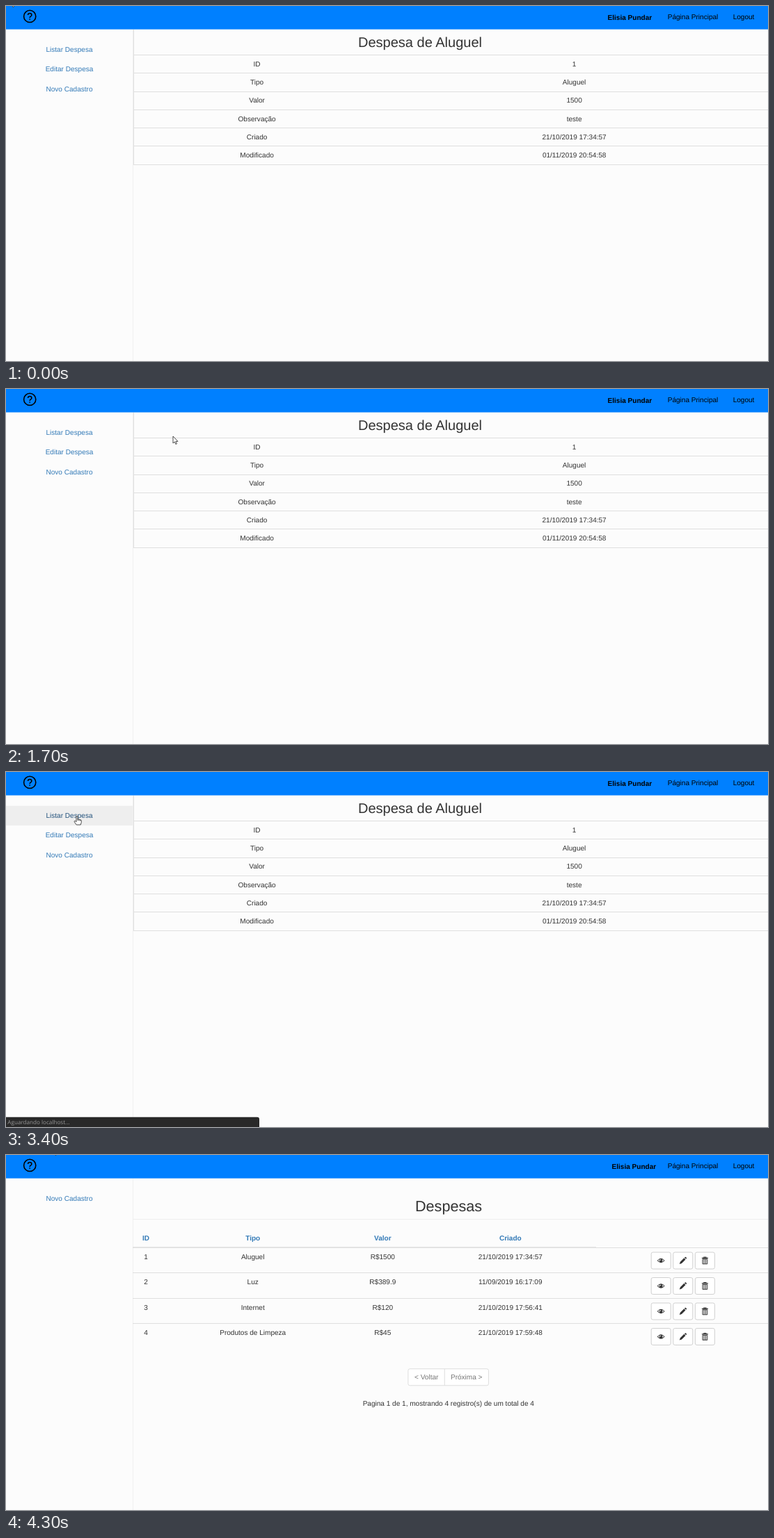
These frames come from a looping animation (1095 by 511 pixels, 4.8 s). An HTML page:

```html
<!DOCTYPE html>
<html lang="pt-BR">
<head>
<meta charset="utf-8">
<title>Despesas</title>
<style>
  html, body { margin: 0; width: 100%; height: 100%; overflow: hidden; background: #fcfcfc; }
  svg { display: block; width: 1095px; height: 511px; }
  text { font: 10.05px "Liberation Sans", Arial, sans-serif; fill: #333; text-anchor: middle; text-rendering: geometricPrecision; }
  .nav { fill: #000; }
  .bold { font-weight: bold; }
  .link { fill: #337ab7; }
  .hover { fill: #23527c; }
  .muted { fill: #777; }
  .status { font: 8.15px "Open Sans", "Noto Sans", sans-serif; text-anchor: start; }
  .cursor { fill: #fff; stroke: #222; stroke-width: .8; stroke-linejoin: round; }
</style>
</head>
<body>
<svg viewBox="0 0 1095 511">
  <defs>
    <g id="eye">
      <path d="M-5.4 0Q0-6.6 5.4 0Q0 6.6-5.4 0Z" fill="#333"/>
      <path d="M-4.1 0Q-3.2-1.5-1.9-2.1Q-2.8 0-1.6 1.7Q-3.2 1.2-4.1 0ZM4.1 0Q3.2-1.5 1.9-2.1Q2.8 0 1.6 1.7Q3.2 1.2 4.1 0Z" fill="#fff"/>
      <circle cx="-.7" cy="-.9" r=".8" fill="#fff"/>
    </g>
    <path id="pencil" fill="#333" d="M-5 5L-3.9 1.8L1.6-3.7L3.7-1.6L-1.8 3.9ZM2.2-4.3L3.2-5.2Q3.7-5.5 4.2-5L5-4.2Q5.5-3.7 5.2-3.2L4.3-2.2Z"/>
    <g id="trash" fill="none" stroke="#333">
      <path d="M-4.5-3.6H4.5M-1.6-4V-5H1.6V-4" stroke-width="1.1"/>
      <path d="M-3.4-2.2V4.8H3.4V-2.2ZM-1.2-2V4.5M1.2-2V4.5" stroke-width="1"/>
    </g>
  </defs>

  <path d="M182.5 34V511" stroke="#f0f0f0"/>
  <g id="detail"></g>
  <g id="list"></g>

  <rect width="1095" height="33.6" fill="#0080ff"/>
  <circle cx="34.2" cy="14.9" r="8.6" fill="none" stroke="#000" stroke-width="1.6"/>
  <path d="M31.5 13.1Q31.5 10.5 34.2 10.5T36.9 12.9Q36.9 14.1 35.5 14.9T34.2 17M34.2 18.2V19.8" fill="none" stroke="#000" stroke-width="1.5"/>
  <text id="user" class="nav bold" y="19.8">Elisia Pundar</text>
  <text class="nav" x="987" y="18.8">Página Principal</text>
  <text class="nav" x="1060" y="18.8">Logout</text>

  <g id="status">
    <path id="statusBox" fill="#292929"/>
    <text id="statusText" class="status" x="2.3" y="507.4"></text>
  </g>
  <path id="arrow" class="cursor" d="M0 0V10L2.3 8L3.9 11.5L5.5 10.8L3.9 7.4H7Z"/>
  <path id="hand" class="cursor" d="M-1 1Q0-.8 1 1V5Q2.3 4 2.8 5.4Q4.2 4.6 4.6 5.9Q6.3 5.4 6.3 7.2V9.5L5.2 13H-.8L-3.8 8.8Q-4.2 7-2.4 7.5L-1 8.8ZM1 5V7M2.8 5.4V7.2M4.6 5.9V7.5"/>
</svg>
<script>
const el = id => document.getElementById(id);
const text = (x, y, s, cls = '', extra = '') =>
  `<text x="${x}" y="${y}" class="${cls}" ${extra}>${s}</text>`;
const rule = (y, x = 183, end = 1095, color = '#dfdfdf') =>
  `<rect x="${x}" y="${y}" width="${end - x}" height="1" fill="${color}"/>`;

function detailPage() {
  const rows = [['ID', '1'], ['Tipo', 'Aluguel'], ['Valor', '1500'], ['Observação', 'teste'],
    ['Criado', '21/10/2019 17:34:57'], ['Modificado', '01/11/2019 20:54:58']];
  const links = ['Listar Despesa', 'Editar Despesa', 'Novo Cadastro'];
  return '<rect id="hoverRow" y="48.6" width="182" height="28.5" fill="#eee"/>' +
    links.map((s, i) => text(91, 65.6 + 28.5 * i, s, 'link', i ? '' : 'id="listLink"')).join('') +
    '<rect x="183" y="34" width="1" height="194" fill="#dfdfdf"/>' + rule(70) +
    text(595, 58.8, 'Despesa de Aluguel', '', 'style="font-size:20px"') +
    rows.map(([label, value], i) => {
      const y = 86.8 + 26.28 * i;
      return text(360.6, y, label) + text(816.6, y, value) + rule(Math.floor(96.7 + 26.3 * i));
    }).join('');
}

function listPage() {
  const columns = [201, 354.7, 541.3, 724.8];
  const rows = [['1', 'Aluguel', 'R$1500', '21/10/2019 17:34:57'],
    ['2', 'Luz', 'R$389.9', '11/09/2019 16:17:09'],
    ['3', 'Internet', 'R$120', '21/10/2019 17:56:41'],
    ['4', 'Produtos de Limpeza', 'R$45', '21/10/2019 17:59:48']];
  const cells = (values, y, cls) => values.map((s, i) => text(columns[i], y, s, cls)).join('');
  const button = (icon, x, y) => `<g transform="translate(${x} ${y})">
    <rect x="-14" y="-12" width="28" height="24" rx="2.5" fill="#fff" stroke="#d0d0d0"/><use href="#${icon}"/></g>`;
  return text(91, 65.6, 'Novo Cadastro', 'link') +
    text(636, 81.2, 'Despesas', '', 'style="font-size:21.6px"') + rule(92, 182, 1095, '#eee') +
    cells(['ID', 'Tipo', 'Valor', 'Criado'], 122.8, 'bold link') +
    rule(132, 182, 848, '#e6e6e6') + rule(133, 182) +
    rows.map((row, i) => {
      const dy = 36.5 * i;
      return cells(row, 149.7 + dy, '') + (i ? rule(Math.floor(133 + dy), 182) : '') +
        ['eye', 'pencil', 'trash'].map((icon, k) => button(icon, 941.2 + 31.6 * k, 152 + dy)).join('');
    }).join('') +
    '<rect x="577.9" y="307.8" width="115.5" height="24" rx="2.5" fill="#fff" stroke="#ddd"/>' +
    '<path d="M630.2 308V332" stroke="#ddd"/>' +
    text(604.2, 323.3, '&lt; Voltar', 'muted') + text(661.7, 323.3, 'Próxima &gt;', 'muted') +
    text(635.8, 360.9, 'Pagina 1 de 1, mostrando 4 registro(s) de um total de 4');
}

el('detail').innerHTML = detailPage();
el('list').innerHTML = listPage();

// Pointer samples: start time, x, y, shape
const pointer = [
  [0, 6, -10, 'arrow'], [400, 120, 45, 'arrow'], [500, 310, 95, 'arrow'], [600, 490, 140, 'arrow'],
  [700, 541, 185, 'arrow'], [800, 450, 225, 'arrow'], [900, 350, 235, 'arrow'],
  [1300, 344, 190, 'arrow'], [1400, 470, 152, 'arrow'], [1500, 562, 120, 'arrow'],
  [1600, 430, 88, 'arrow'], [1700, 240, 68, 'arrow'], [1800, 133, 65, 'hand'],
  [1900, 119, 67, 'hand'], [2000, 109, 67, 'hand'], [2100, 104, 65, 'hand'],
  [2200, 102, 64, 'hand'], [2800, 102, 63, 'hand'],
  [3800, 98.5, 52.5, 'hand'], [3900, 94, 38, 'arrow'], [4000, 88, 22, 'arrow'],
  [4100, 80, 8, 'arrow'], [4200, 73, -4, 'arrow'], [4300, 67, -11, 'arrow']];

// Status bar: start time, width, message, text colour
const statuses = [[0, 0, ''], [2300, 110, 'localhost/projeto/despesas', '#bbb'],
  [3400, 364, 'Aguardando localhost...', '#999'],
  [3800, 128, 'localhost/projeto/despesas/add', '#bbb'], [4000, 0, '']];

const current = (steps, t) => steps.findLast(step => step[0] <= t);
const show = (id, visible) => { el(id).style.display = visible ? '' : 'none'; };

function draw(now) {
  const t = now % 4800;
  const listing = t >= 3800;
  const hovering = t >= 1800 && !listing;
  show('detail', !listing);
  show('list', listing);
  show('hoverRow', hovering);
  el('listLink').setAttribute('class', hovering ? 'hover' : 'link');
  el('user').setAttribute('x', listing ? 902.4 : 896.4);

  const [, x, y, shape] = current(pointer, t);
  for (const id of ['arrow', 'hand']) show(id, id === shape);
  el(shape).setAttribute('transform', `translate(${x} ${y})`);

  const [, width, message, color] = current(statuses, t);
  show('status', width > 0);
  if (width) {
    el('statusBox').setAttribute('d', `M0 496.8H${width - 3}Q${width} 496.8 ${width} 499.8V511H0Z`);
    el('statusText').textContent = message;
    el('statusText').style.fill = color;
  }
  requestAnimationFrame(draw);
}

const start = performance.now();
requestAnimationFrame(function tick() {
  draw(0);
});
</script>
</body>
</html>
```
